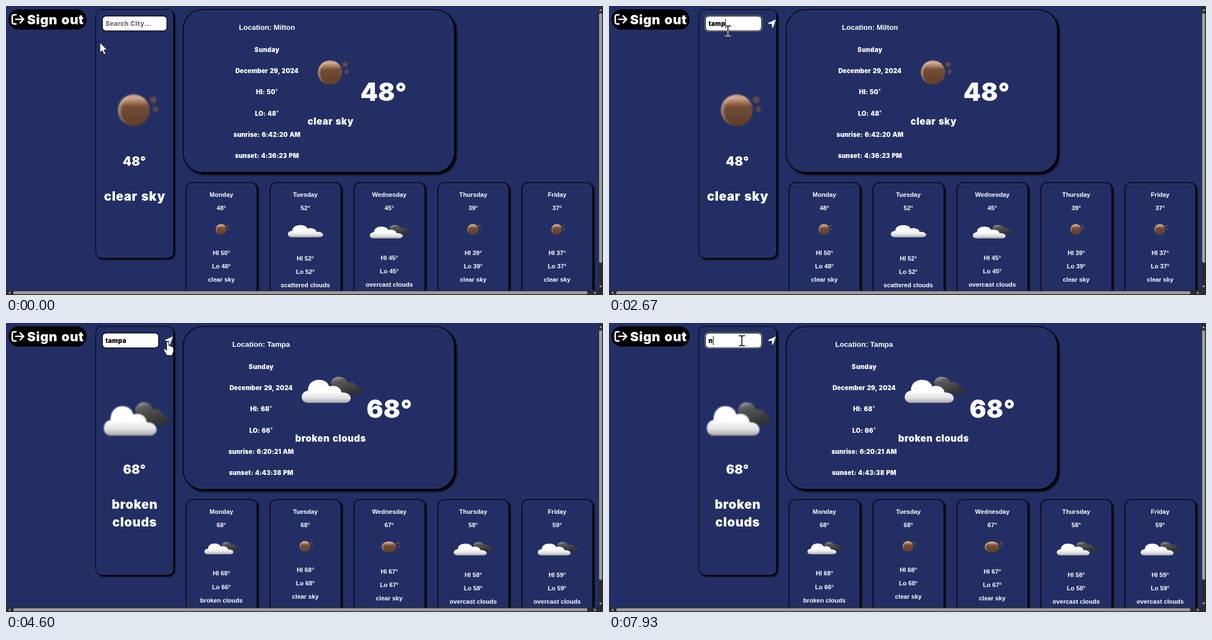
An HTML page for the animation above (8000 ms loop, 1074 by 521 pixels).

```html
<!DOCTYPE html>
<html lang="en">
<head>
<meta charset="utf-8">
<title>Weather dashboard</title>
<style>
  html, body { margin: 0; width: 100%; height: 100%; overflow: hidden; background: #232f64; }
  svg { display: block; width: 100vw; height: 100vh; }
  text { fill: #fff; font: 700 11.2px "Liberation Sans", Arial, sans-serif; white-space: pre; }
  .mid { text-anchor: middle; }
  .heavy { font-family: Inter, "Liberation Sans", sans-serif; font-weight: 900; letter-spacing: .03em; word-spacing: .08em; }
  .num { letter-spacing: .008em; }
  .box { fill: #232f64; stroke: #000; }
</style>
</head>
<body>
<svg id="stage" viewBox="0 0 1074 521" xmlns="http://www.w3.org/2000/svg"></svg>
<script>
const LOOP = 8000, FPS = 15;
const stage = document.getElementById('stage');

// ---- drawing helpers ----
const text = (x, y, str, size = 11.2, cls = 'mid') =>
  `<text x="${x}" y="${y}" class="${cls}" style="font-size:${size}px">${str}</text>`;
const heavy = (x, y, str, size = 11.2, cls = 'mid') => text(x, y, str, size, 'heavy ' + cls);
const box = (x, y, w, h, r, line, shadow) =>
  `<rect class="box" x="${x}" y="${y}" width="${w}" height="${h}" rx="${r}" stroke-width="${line}" filter="url(#${shadow})"/>`;

function star(cx, cy, r) {
  const pts = [];
  for (let i = 0; i < 10; i++) {
    const a = i * Math.PI / 5 - 1.4, d = i % 2 ? r * .55 : r;
    pts.push((cx + d * Math.cos(a)).toFixed(2) + ',' + (cy + d * Math.sin(a)).toFixed(2));
  }
  return `<polygon points="${pts.join(' ')}" fill="#654a45"/>`;
}

const moon = (cx, cy, sx, sy = sx) =>
  `<g transform="translate(${cx} ${cy}) scale(${sx} ${sy})" filter="url(#blur)">
    <circle r="28.5" fill="url(#moon)"/><circle r="28.5" fill="url(#rim)"/>
    ${star(35, -19, 8.5)}${star(39, -2, 6.5)}</g>`;

const FRONT = 'M12 60C-4 60-4 34 12 32C12 15 22 7 33 7C44 7 51 13 53 22C64 18 76 24 77 36C99 35 100 60 83 60Z';
const BACK = 'M56 15C58 4 65 0 71 0C80 0 87 5 88 13C96 10 104 14 105 22C119 22 120 39 107 39H70Z';
const cloud = (x, y, sx, sy, dark = true) =>
  `<g transform="translate(${x} ${y}) scale(${sx} ${sy})" filter="url(#blur)">
    ${dark ? `<path d="${BACK}" fill="url(#dark)"/>` : ''}<path d="${FRONT}" fill="url(#white)"/></g>`;

// ---- forecasts ----
const DAYS = ['Monday', 'Tuesday', 'Wednesday', 'Thursday', 'Friday'];
const dayX = i => 387.5 + 151 * i;

function dayIcon(kind, x) {
  switch (kind) {
    case 'moon': return moon(x - .5, 402.7, .34);
    case 'wide': return moon(x - .5, 403.7, .46, .35);
    case 'cloud': return cloud(x - 31.5, 392, .67, .415, false);
    case 'pair': return cloud(x - 30.5, 395, .55, .367);
    default: return cloud(x - 35, 395, .625, .4);
  }
}

function forecast(f) {
  const cards = f.days.map(([temp, hi, lo, sky, kind, y], i) => {
    const x = dayX(i);
    return text(x, 368, temp + '°') + dayIcon(kind, x) + text(x, y, `HI ${hi}°`) +
      text(x, y + 24.2, `Lo ${lo}°`) + text(x, y + 48.4, sky);
  }).join('');
  const lines = ['Sunday', 'December 29, 2024', `HI: ${f.hi}˚`, `LO: ${f.lo}˚`, 'sunrise: ' + f.rise, 'sunset: ' + f.set]
    .map((s, i) => heavy(f.x, 83 + 38.2 * i, s, 11.2, i ? 'mid num' : 'mid')).join('');
  const side = f.sky.length > 9 ? f.sky.split(' ') : [f.sky];
  return text(f.x, 42.6, 'Location: ' + f.city, 13.1) + lines + f.icons +
    heavy(f.tempX, 171, f.temp + '°', 44.8, 'num') + heavy(584, 214, f.sky, 16.8) +
    heavy(231, f.sideY, f.temp + '°', 22.4, 'mid num') +
    side.map((s, i) => heavy(231.5, f.sideY + 63 + 31.5 * i, s, 22.4)).join('') + cards;
}

const milton = {
  city: 'Milton', x: 469.5, hi: 50, lo: 48, rise: '6:42:20 AM', set: '4:36:23 PM',
  temp: 48, tempX: 637.5, sky: 'clear sky', sideY: 288,
  icons: moon(230, 188, 1) + moon(583, 120, .767),
  days: [
    [48, 50, 48, 'clear sky', 'moon', 448.7],
    [52, 52, 52, 'scattered clouds', 'cloud', 458.7],
    [45, 45, 45, 'overcast clouds', 'overcast', 457.8],
    [39, 39, 39, 'clear sky', 'moon', 449],
    [37, 37, 37, 'clear sky', 'moon', 448.7]
  ]
};
const tampa = {
  city: 'Tampa', x: 459, hi: 68, lo: 66, rise: '6:20:21 AM', set: '4:43:38 PM',
  temp: 68, tempX: 648.5, sky: 'broken clouds', sideY: 272,
  icons: cloud(176, 143, 1, 1) + cloud(532, 97, .931, .783),
  days: [
    [68, 68, 66, 'broken clouds', 'pair', 455.3],
    [68, 68, 68, 'clear sky', 'moon', 448.7],
    [67, 67, 67, 'clear sky', 'wide', 452],
    [58, 58, 58, 'overcast clouds', 'overcast', 457.8],
    [59, 59, 59, 'overcast clouds', 'overcast', 457.8]
  ]
};

// ---- scene ----
const shadow = (id, d, blur) =>
  `<filter id="${id}" x="-10%" y="-10%" width="125%" height="125%" color-interpolation-filters="sRGB"><feDropShadow dx="${d}" dy="${d}" stdDeviation="${blur}" flood-color="#000"/></filter>`;

stage.innerHTML = `
<defs>
  ${shadow('deep', 3.5, 1.7)}${shadow('soft', 2.4, 1.2)}
  <filter id="blur" color-interpolation-filters="sRGB"><feGaussianBlur stdDeviation=".8"/></filter>
  <linearGradient id="moon" x2="0" y2="1">
    <stop offset="0" stop-color="#a5806c"/><stop offset=".1" stop-color="#d3ab93"/>
    <stop offset=".24" stop-color="#a87a5e"/><stop offset=".38" stop-color="#744d36"/>
    <stop offset=".7" stop-color="#694630"/><stop offset="1" stop-color="#5e3d2a"/>
  </linearGradient>
  <radialGradient id="rim" cx=".6" cy=".56" r=".6">
    <stop offset=".78" stop-color="#dcb8a2" stop-opacity="0"/><stop offset="1" stop-color="#dcb8a2" stop-opacity=".7"/>
  </radialGradient>
  <linearGradient id="white" x2="0" y2="1">
    <stop offset=".5" stop-color="#fff"/><stop offset=".8" stop-color="#dedede"/><stop offset="1" stop-color="#a4a4a4"/>
  </linearGradient>
  <linearGradient id="dark" x2=".5" y2="1">
    <stop offset="0" stop-color="#b5b5b5"/><stop offset=".3" stop-color="#5a5a5a"/><stop offset="1" stop-color="#333"/>
  </linearGradient>
</defs>
<rect width="1074" height="521" fill="#232f64"/>
<rect x="4.5" y="6" width="140.5" height="36.5" rx="18" fill="#000"/>
<path d="M18 15.8H14.5Q11.2 15.8 11.2 19V29Q11.2 32.3 14.5 32.3H18M17.5 24H31M25.5 17.8L31.7 24L25.5 30.2"
  fill="none" stroke="#fff" stroke-width="2.7" stroke-linecap="round" stroke-linejoin="round"/>
${heavy(38, 33, 'Sign out', 23, '')}
${box(161.5, 6.3, 140, 448.2, 11, 1, 'soft')}
${box(318.8, 6.4, 487.8, 293.6, 35, 1.4, 'deep')}
${DAYS.map((d, i) => box(324.1 + 151 * i, 318.4, 127.5, 230, 11, 1.4, 'soft') + text(dayX(i), 344, d)).join('')}
<g id="before">${forecast(milton)}</g>
<g id="after">${forecast(tampa)}</g>
<rect id="ring" x="172.4" y="16.8" height="29.2" rx="7" fill="#fff"/>
<rect id="field" x="173.5" y="18" height="26.8" rx="6" fill="#fff" stroke="#000" stroke-width="1.3"/>
<text id="value" class="heavy" x="179" y="36"></text>
<rect id="caret" y="23.5" width="1" height="16.5" fill="#000"/>
<path id="send" d="M300.3 24.3L295.2 38.6Q294.3 40 293.4 38.4V32.2H287.2Q285.7 31.2 287 30.2Z" fill="#fff"/>
<g>
  <path d="M1066 0H1074V521H0V513H1066Z" fill="#2b2b2b"/>
  <rect x="1067" y="13" width="5.4" height="450" rx="2.7" fill="#9f9f9f"/>
  <rect x="13" y="514.2" width="1033" height="5.4" rx="2.7" fill="#9f9f9f"/>
  <path d="M1067 9L1069.7 5L1072.4 9ZM1067 504L1069.7 508L1072.4 504ZM8 514.2L4 517L8 519.7ZM1058 514.2L1062 517L1058 519.7Z" fill="#9f9f9f"/>
</g>
<path id="arrow" d="M0 0V18L4.2 14.3L7.2 21.3L10.2 20L7.2 13H13Z" fill="#fff" stroke="#000" stroke-width=".8"/>
<path id="beam" d="M-5.5-9H-1.5L0-8L1.5-9H5.5M0-8.5V8.5M-5.5 9H-1.5L0 8L1.5 9H5.5" fill="none" stroke="#fff" stroke-width="1.6" style="mix-blend-mode:difference"/>
<path id="hand" d="M-2 1.5Q0-1.2 2 1.5V8Q4.2 7 5 9Q7.4 8.3 8 10.2Q10.3 10 10.3 12.5V18Q10 21 8 23.5V25.5H-2.5V23.5Q-5 20-7 16.5Q-7.6 13-5 13.5L-2 16.5Z" fill="#fff" stroke="#000" stroke-width=".9"/>`;

const el = {};
stage.querySelectorAll('g[id],rect[id],path[id],text[id]').forEach(e => el[e.id] = e);
const show = (e, on) => e.setAttribute('visibility', on ? 'visible' : 'hidden');

// ---- timeline, in ticks of 1/15 s ----
const TYPED = [[0, ''], [33, 't'], [34, 'ta'], [36, 'tam'], [40, 'tamp'], [42, 'tampa'],
  [95, 'tamp'], [98, 'tam'], [101, 'ta'], [104, 't'], [105, ''], [119, 'n']];
const CARET = [[12, 20], [28, 50], [58, 60], [81, 89], [97, 112], [119, 120]];
const FOCUS = [[12, 60], [81, 120]];
const SWITCH = 69;
// tick, x, y, ease-out power of the way on to the next point
const PATH = [[0, 169, 66, 1.8], [8, 214, 45, 1], [49, 214, 45, 1], [54, 275, 38, 2],
  [59, 291, 33, 1], [71, 291, 33, 1.8], [76, 239, 32, 1], [120, 239, 32, 1]];

const within = (spans, n) => spans.some(([a, b]) => n >= a && n < b);

function pointer(n) {
  const i = PATH.findIndex(p => p[0] > n);
  const a = PATH[i - 1], b = PATH[i];
  const u = 1 - Math.pow(1 - (n - a[0]) / (b[0] - a[0]), a[3]);
  return [a[1] + (b[1] - a[1]) * u, a[2] + (b[2] - a[2]) * u];
}

function draw(ms) {
  const n = Math.floor(ms * FPS / 1000 + .06) % 120;
  const typed = TYPED.filter(k => k[0] <= n).pop()[1];
  const width = typed ? 101 : 116;

  show(el.before, n < SWITCH);
  show(el.after, n >= SWITCH);

  el.field.setAttribute('width', width);
  el.ring.setAttribute('width', width + 2.2);
  show(el.ring, within(FOCUS, n));
  show(el.send, typed);
  el.value.textContent = typed || 'Search City...';
  el.value.style.fill = typed ? '#000' : '#757575';
  el.caret.setAttribute('x', 179 + (typed ? Math.round(el.value.getComputedTextLength()) : 0));
  show(el.caret, within(CARET, n));

  const [x, y] = pointer(n);
  const overField = x > 173 && x < 174.5 + width && y > 17 && y < 46;
  const kind = typed && x > 284 ? 'hand' : overField ? 'beam' : 'arrow';
  for (const k of ['arrow', 'beam', 'hand']) show(el[k], k === kind);
  el[kind].setAttribute('transform', `translate(${x.toFixed(1)} ${y.toFixed(1)})`);
}

const start = performance.now();
function loop() {
  draw((performance.now() - start) % LOOP);
  requestAnimationFrame(loop);
}
loop();
</script>
</body>
</html>
```
